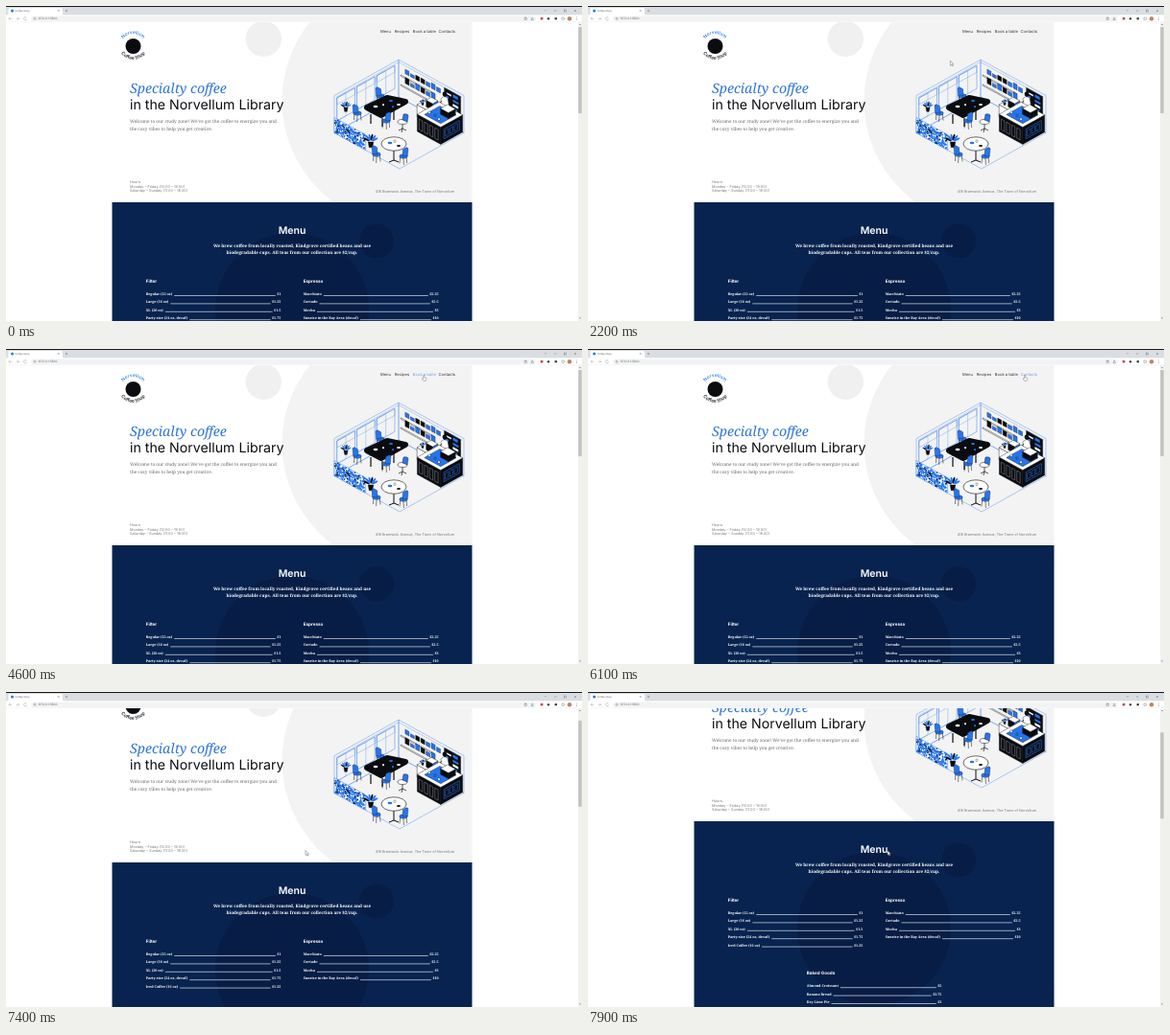
Animation, 600 px wide and 329 px high, one loop 8000 ms. Source, as an HTML page:

```html
<!DOCTYPE html>
<html lang="en">
<head>
<meta charset="utf-8">
<title>Coffee shop page</title>
<style>
  html, body { margin: 0; width: 100%; height: 100%; overflow: hidden; background: #fff; }
  svg { display: block; width: 600px; height: 329px; }
  text { text-rendering: geometricPrecision; white-space: pre; }
  .sans { font-family: Inter, Roboto, sans-serif; }
  .serif { font-family: "Noto Serif", serif; }
</style>
</head>
<body>
<svg id="stage" viewBox="0 0 600 329" xmlns="http://www.w3.org/2000/svg"></svg>
<script>
const LOOP = 8000, STEP = 100;
const BLUE = '#2675ea', LINE = '#5d98f0', INK = '#0b0c10', NAVY = '#08234f', DEEP = '#081d45', PALE = '#f3f3f3';
const stage = document.getElementById('stage');

// Seeded random numbers
let seed = 11;
const rnd = () => (seed = (seed * 16807) % 2147483647) / 2147483647;

// Shape helpers, each returning markup
const rect = (x, y, w, h, fill, more = '') =>
  `<rect x="${x}" y="${y}" width="${w}" height="${h}" fill="${fill}" ${more}/>`;
const circle = (x, y, r, fill, more = '') =>
  `<circle cx="${x}" cy="${y}" r="${r}" fill="${fill}" ${more}/>`;
const oval = (x, y, rx, ry, fill, more = '') =>
  `<ellipse cx="${x}" cy="${y}" rx="${rx}" ry="${ry}" fill="${fill}" ${more}/>`;
const path = (d, stroke, w = .5, fill = 'none', more = '') =>
  `<path d="${d}" fill="${fill}" stroke="${stroke}" stroke-width="${w}" ${more}/>`;
const poly = (pts, fill, stroke = 'none', w = .5) =>
  path('M' + pts.map(p => p.map(n => n.toFixed(2))).join('L') + 'Z', stroke, w, fill, 'stroke-linejoin="round"');
const text = (x, y, str, size, fill, more = 'class="sans"') =>
  `<text x="${x}" y="${y}" font-size="${size}" fill="${fill}" ${more}>${str}</text>`;

// Isometric room: a runs along the left wall, b along the right wall, h is up
const iso = (a, b, h = 0) => [409 - 67 * a + 68 * b, 95 + 37.5 * (a + b) - h];
const faceA = (a, b0, b1, h0, h1, fill, stroke, w) =>
  poly([iso(a, b0, h0), iso(a, b1, h0), iso(a, b1, h1), iso(a, b0, h1)], fill, stroke, w);
const faceB = (b, a0, a1, h0, h1, fill, stroke, w) =>
  poly([iso(a0, b, h0), iso(a1, b, h0), iso(a1, b, h1), iso(a0, b, h1)], fill, stroke, w);
const slab = (a0, a1, b0, b1, h, fill, stroke, w) =>
  poly([iso(a0, b0, h), iso(a1, b0, h), iso(a1, b1, h), iso(a0, b1, h)], fill, stroke, w);
const box = (a0, a1, b0, b1, h0, h1, top, left, right, line = INK) =>
  faceA(a1, b0, b1, h0, h1, left, line, .4) +
  faceB(b1, a0, a1, h0, h1, right, line, .4) +
  slab(a0, a1, b0, b1, h1, top, line, .4);

const chair = (x, y, flip = 1) => `<g transform="translate(${x} ${y}) scale(${flip} 1)">` +
  path('M-3 0L-3.6 8M3.2 0.5L4 8.5M0 2L-.4 10', INK, .5) +
  oval(0, 1, 4.2, 2.2, BLUE, `stroke="${INK}" stroke-width=".3"`) +
  path('M-4.4 .6L-5 -7Q-4.2 -9 -2.4 -8L.6 -6.2L1 1Z', INK, .3, BLUE) + '</g>';

const deskChair = (x, y) =>
  path(`M${x} ${y}v7m-4 2l4 -2l4 2m-4 -2l-1 4`, INK, .7) +
  oval(x, y, 5, 2.5, '#fff', `stroke="${INK}" stroke-width=".5"`) +
  path(`M${x + 1} ${y - 8}q5 -1 5 2l-1 6l-5 -2z`, INK, .4, BLUE);

const plant = (x, y, s) => {
  let out = path(`M${x - 2.4 * s} ${y}h${4.8 * s}l${-.9 * s} ${5 * s}h${-3 * s}z`, INK, .4, INK);
  for (let i = 0; i < 6; i++) {
    out += oval(0, -4.4 * s, .9 * s, 3 * s, i % 3 ? BLUE : INK,
      `transform="translate(${x} ${y}) rotate(${-60 + i * 24})"`);
  }
  return out;
};

const cup = (x, y, fill = '#fff') => rect(x, y - 2, 2, 2.2, fill, `stroke="${INK}" stroke-width=".3"`);

function windows() {
  let out = '';
  for (let i = 0; i < 3; i++) {
    const a = .06 + i * .31;
    out += faceB(0, a, a + .28, 11, 35, 'none', LINE, .6);
    out += faceB(0, a + .14, a + .28, 11, 35, 'none', LINE, .4);
    out += faceB(0, a, a + .28, 28, 35, 'none', LINE, .4);
  }
  return out;
}

function shelves() {
  let out = '';
  for (const [h, b0, b1] of [[28, .1, .6], [18, .1, .52]]) {
    for (let b = b0; b < b1; b += .08) {
      const fill = rnd() < .5 ? BLUE : INK;
      out += faceA(0, b, b + .06, h, h + 3 + rnd() * 4, fill, INK, .3);
    }
    out += faceA(.05, b0 - .02, b1, h - 1.2, h, '#fff', INK, .4);
  }
  return out;
}

function screen() {
  let out = faceA(1, 0, .48, 0, 16, '#fff', BLUE, .5);
  for (let i = 0; i < 240; i++) {
    const [x, y] = iso(1, .01 + rnd() * .46, .6 + rnd() * 14.8).map(n => n.toFixed(1));
    out += oval(x, y, 1.1, .7, rnd() < .88 ? BLUE : INK, `transform="rotate(${Math.round(rnd() * 90)} ${x} ${y})"`);
  }
  return out;
}

function bar() {
  // Wall board behind the bar
  let out = faceA(0, .7, .95, 15, 36, INK, INK, .4);
  for (let i = 0; i < 8; i++) {
    const b = .72 + (i % 2) * .11, h = 17 + (i >> 1) * 4.6;
    out += faceA(0, b, b + .04 + rnd() * .05, h, h + 1.5 + rnd() * 2, i % 3 ? BLUE : '#fff');
  }
  out += box(0, .14, .42, .8, 0, 13, '#fff', '#fff', INK);
  out += box(.02, .1, .52, .62, 13, 20, '#fff', INK, BLUE);
  // Barista
  out += path('M454 107l-1 -10q3 -4 7 -1l2 11z', INK, .4, '#fff') + circle(457, 92, 2.4, INK) +
    path('M454 99l-5 5l4 2', INK, .7);
  out += box(0, .34, .62, .98, 0, 18, '#fff', INK, INK);
  out += slab(.05, .29, .68, .93, 18, BLUE, INK, .4);
  for (let i = 0; i < 4; i++)
    out += faceA(.34, .65 + i * .08, .7 + i * .08, 3, 14, 'none', '#dfe8f7', .3);
  out += faceB(.98, .05, .29, 4, 14, INK, BLUE, .6);
  for (let i = 0; i < 3; i++)
    out += faceB(.98, .08 + i * .07, .13 + i * .07, 6, 12, 'none', BLUE, .5);
  out += box(.05, .16, .8, .92, 18, 24, '#fff', INK, INK);
  out += cup(440, 112) + cup(446, 115, BLUE) + cup(450, 119) + cup(453, 113, INK);
  return out + plant(434, 101, .5);
}

function room() {
  let out = slab(0, 1, 0, 1, 0, 'none', LINE, .5);
  out += faceB(0, 0, 1, 0, 39, 'none', LINE, .5) + faceA(0, 0, 1, 0, 39, 'none', LINE, .5);
  out += path('M344 95.2L409 58.6L475 95.2', LINE, .4);
  out += windows() + shelves() + bar();
  out += plant(354, 106, .85) + chair(366, 111) + chair(390, 93);
  // Long table
  out += path('M380 113v10M404 109v10M392 117v9', INK, 1.2);
  out += path('M376 106L397 96L416 100L391 114Z', INK, 6, INK, 'stroke-linejoin="round"');
  out += oval(385, 105, 2.4, 1.2, '#fff') + oval(401, 99, 2, 1, BLUE) + oval(409, 103, 2, 1, '#fff') +
    cup(392, 104) + cup(402, 106, BLUE);
  out += deskChair(413, 121) + chair(396, 119, -1);
  out += screen() + plant(380, 142, 1.15);
  // Round table
  out += chair(386, 154);
  out += path('M404 146v15m-5 2l5 -2l5 2', INK, 1);
  out += oval(404, 144, 13, 7.2, '#fff', `stroke="${INK}" stroke-width=".6"`);
  out += oval(400, 143, 2.4, 1.3, BLUE) + oval(409, 146, 2, 1, INK) + cup(404, 142);
  return out + chair(414, 156, -1);
}

const NAV = [['Menu', 390], ['Recipes', 404.8], ['Book a table', 423.8], ['Contacts', 450.6]];

function hero() {
  const soft = '#77797d';
  return rect(110.5, 17, 375, 188, '#fff') +
    `<g clip-path="url(#heroBox)">${circle(418.5, 99, 131, PALE)}${circle(268.3, 34.3, 18.7, '#f0f0f0')}</g>` +
    // Shop badge
    circle(132.5, 42, 8, INK) +
    '<path id="arcTop" d="M119.4 42A13 13 0 0 1 145.4 42" fill="none"/>' +
    '<path id="arcLow" d="M116.6 40A15.8 15.8 0 0 0 148.2 40" fill="none"/>' +
    [['arcTop', 'Norvellum', BLUE], ['arcLow', 'Coffee Shop', INK]].map(([id, name, fill]) =>
      `<text class="sans" font-size="4.9" font-weight="500" fill="${fill}" text-anchor="middle">` +
      `<textPath href="#${id}" startOffset="50%">${name}</textPath></text>`).join('') +
    NAV.map(([name, x]) => text(x, 28.1, name, 4.1, '#333', 'class="sans nav"')).join('') +
    text(129, 91, 'Specialty coffee', 14.2, '#2f74d8', 'class="serif" font-style="italic"') +
    text(129, 107.8, 'in the Norvellum Library', 14.2, INK) +
    text(129, 122.4, 'Welcome to our study zone! We\'ve got the coffee to energize you and', 4.7, '#66686c', 'class="serif"') +
    text(129, 129.7, 'the cozy vibes to help you get creative.', 4.7, '#66686c', 'class="serif"') +
    ['Hours:', 'Monday – Friday (10:00 – 19:00)', 'Saturday – Sunday (11:00 – 18:00)']
      .map((s, i) => text(129, 185.2 + i * 4.6, s, 3.8, soft)).join('') +
    text(467, 194.5, '418 Bramwick Avenue, The Town of Norvellum', 3.75, soft, 'class="sans" text-anchor="end"') +
    room();
}

const LISTS = [
  ['Filter', 145.7, 286.3, 288.8, [['Regular (12 oz)', '$1'], ['Large (16 oz)', '$1.25'], ['XL (20 oz)', '$1.5'],
    ['Party-size (24 oz, decaf)', '$1.75'], ['Iced Coffee (16 oz)', '$1.25']]],
  ['Espresso', 309.7, 450.5, 288.8, [['Macchiato', '$2.25'], ['Cortado', '$2.5'], ['Mocha', '$3'],
    ['Sunrise in the Bay Area (decaf)', '$10']]],
  ['Baked Goods', 227.8, 368.4, 365, [['Almond Croissant', '$2'], ['Banana Bread', '$2.75'], ['Key Lime Pie', '$3']]],
];

function menu() {
  const mid = 'text-anchor="middle"', item = 'class="serif" font-weight="600"';
  let out = rect(110.5, 205, 375, 420, NAVY) + circle(298, 317, 80, DEEP) + circle(386, 245.5, 18, DEEP) +
    text(298, 238.2, 'Menu', 10.5, '#fff', `class="sans" font-weight="600" ${mid}`) +
    text(298, 251.6, 'We brew coffee from locally roasted, Kindgrove certified beans and use', 4.55, '#fff', `${item} ${mid}`) +
    text(298, 258.8, 'biodegradable cups. All teas from our collection are $2/cup.', 4.55, '#fff', `${item} ${mid}`);
  for (const [title, x, right, y, rows] of LISTS) {
    out += text(x, y, title, 4.6, '#fff', 'class="sans" font-weight="700"');
    rows.forEach(([name, price], i) => {
      const base = y + 13.1 + i * 8.4;
      out += '<g class="row">' + text(x, base, name, 3.65, '#fff', item) +
        text(right, base, price, 3.65, '#fff', `${item} text-anchor="end"`) +
        `<line y1="${base + .6}" y2="${base + .6}" stroke="#fff" stroke-width=".6"/></g>`;
    });
  }
  return out;
}

function browser() {
  const grey = '#5f6368', faint = '#9a9da1';
  return rect(0, 0, 600, 10, '#dadde2') + rect(0, 0, 600, 1, '#17181a') +
    path('M1 10Q2.4 10 2.4 8.4V3.4Q2.4 2 4 2H57.5Q59 2 59 3.4V8.4Q59 10 60.5 10Z', 'none', 0, '#fff') +
    rect(0, 9.3, 600, 7.7, '#fff') + rect(0, 16.7, 600, .3, '#e3e4e6') +
    circle(6.5, 5, 1.5, BLUE) + text(9.4, 6.1, 'Coffee Shop', 2.6, grey) +
    path('M53.8 4l1.8 1.8m0 -1.8l-1.8 1.8M61.8 5h2.4m-1.2 -1.2v2.4', grey, .4) +
    path('M561 4.2l1 1l1 -1M571 5h2.4M592 4l2 2m0 -2l-2 2', grey, .4) +
    rect(581.5, 4, 2, 2, 'none', `stroke="${grey}" stroke-width=".4"`) +
    path('M6 13.2H3m1.3 -1.3L3 13.2l1.3 1.3', faint, .5) + path('M10.5 13.2h3m-1.3 -1.3l1.3 1.3l-1.3 1.3', faint, .5) +
    path('M21.3 12.2a1.6 1.6 0 1 0 .3 1.4', faint, .5) +
    rect(26, 10.5, 526, 5.5, '#f1f3f4', 'rx="2.7"') + circle(30, 13.2, 1.1, 'none', `stroke="${grey}" stroke-width=".4"`) +
    text(33.3, 14.3, '127.0.0.1:5500', 3.1, grey) +
    path('M540 14.4v-2h2.4v2zM541.2 13v-1.8', grey, .4) + path('M547 14.5l1.2 -2.6l1.2 2.6z', grey, .4) +
    rect(556.8, 11.8, 2.6, 2.6, '#c4474d') + circle(565, 13.2, 1.2, '#444') + rect(571.6, 12, 2.3, 2.3, '#3c4043') +
    rect(579, 12, 2.6, 2.4, 'none', `stroke="${grey}" stroke-width=".4"`) + circle(587, 13.2, 2.2, '#b98562') +
    [11.8, 13.2, 14.6].map(y => circle(594.4, y, .4, grey)).join('') +
    rect(596, 17, 4, 312, '#f1f1f1') + path('M597 20l1 -1.2l1 1.2zM597 325.5l1 1.2l1 -1.2z', 'none', 0, '#777') +
    rect(596.3, 22, 3.4, 90, '#c1c1c1', 'id="thumb"');
}

stage.innerHTML = `<defs><clipPath id="heroBox">${rect(110.5, 17, 375, 188, '#000')}</clipPath></defs>` +
  `<g id="page">${hero()}${menu()}</g>${browser()}<g id="cursor">` +
  path('M0 0V5L1.2 4L2 5.7L2.8 5.3L2 3.7H3.5Z', '#333', .35, '#fff', 'id="arrow"') +
  path('M-.5 0Q0 -.7 .5 0V2.2L2.6 2.8Q3 4.6 2 5.8H-.4L-1.9 3.4Q-1.4 2.8 -.5 3.6Z', '#444', .35, '#fff', 'id="hand"') + '</g>';

// Leader lines fill the gap between name and price
for (const row of stage.querySelectorAll('.row')) {
  const [name, price, line] = row.children;
  line.setAttribute('x1', +name.getAttribute('x') + name.getComputedTextLength() + 2);
  line.setAttribute('x2', +price.getAttribute('x') - price.getComputedTextLength() - 1.5);
}

const SCROLL = [[6950, 0], [7400, 27], [7700, 48.3], [7900, 70]];
const POINTER = [[1900, 345, 112], [2400, 395, 27.5], [2800, 395, 27.5], [3100, 408, 27.5], [3800, 409, 27.5],
  [4200, 434, 27.5], [4900, 436, 27.5], [5300, 455, 27.5], [6150, 455, 27.5], [6800, 312, 165.5]];
const HOVER = [[2300, 2900], [2900, 3850], [3950, 4950], [5050, 6150]];

const clamp = v => Math.min(1, Math.max(0, v));
const smooth = v => v * v * (3 - 2 * v);
const mix = (from, to, k) => from + (to - from) * k;

// Values of a [time, ...values] table at time t
function at(table, t, ease = v => v) {
  const next = table.findIndex(row => row[0] > t);
  if (next < 0) return table[table.length - 1].slice(1);
  if (next === 0) return table[0].slice(1);
  const from = table[next - 1], to = table[next];
  const k = ease((t - from[0]) / (to[0] - from[0]));
  return from.slice(1).map((v, i) => mix(v, to[i + 1], k));
}

const [page, thumb, cursor, arrow, hand] =
  ['page', 'thumb', 'cursor', 'arrow', 'hand'].map(id => document.getElementById(id));
const links = [...stage.querySelectorAll('.nav')];

function draw(t) {
  const [scroll] = at(SCROLL, t);
  page.setAttribute('transform', `translate(0 ${-scroll})`);
  thumb.setAttribute('y', 22 + scroll * .29);

  const [x, y] = at(POINTER, t, smooth);
  cursor.setAttribute('transform', `translate(${x} ${y})`);
  cursor.style.display = t < POINTER[0][0] ? 'none' : '';
  const over = HOVER.some(([on, off]) => t >= on && t <= off);
  arrow.style.display = over ? 'none' : '';
  hand.style.display = over ? '' : 'none';

  links.forEach((link, i) => {
    const [on, off] = HOVER[i];
    const k = clamp((t - on) / 250) * (1 - clamp((t - off) / 250));
    link.setAttribute('fill', `rgb(${[110, 160, 240].map(c => Math.round(mix(51, c, k)))})`);
  });
}

const start = performance.now();
function tick() {
  const t = (performance.now() - start) % LOOP;
  draw(Math.floor(t / STEP) * STEP);
  requestAnimationFrame(tick);
}
tick();
</script>
</body>
</html>
```
